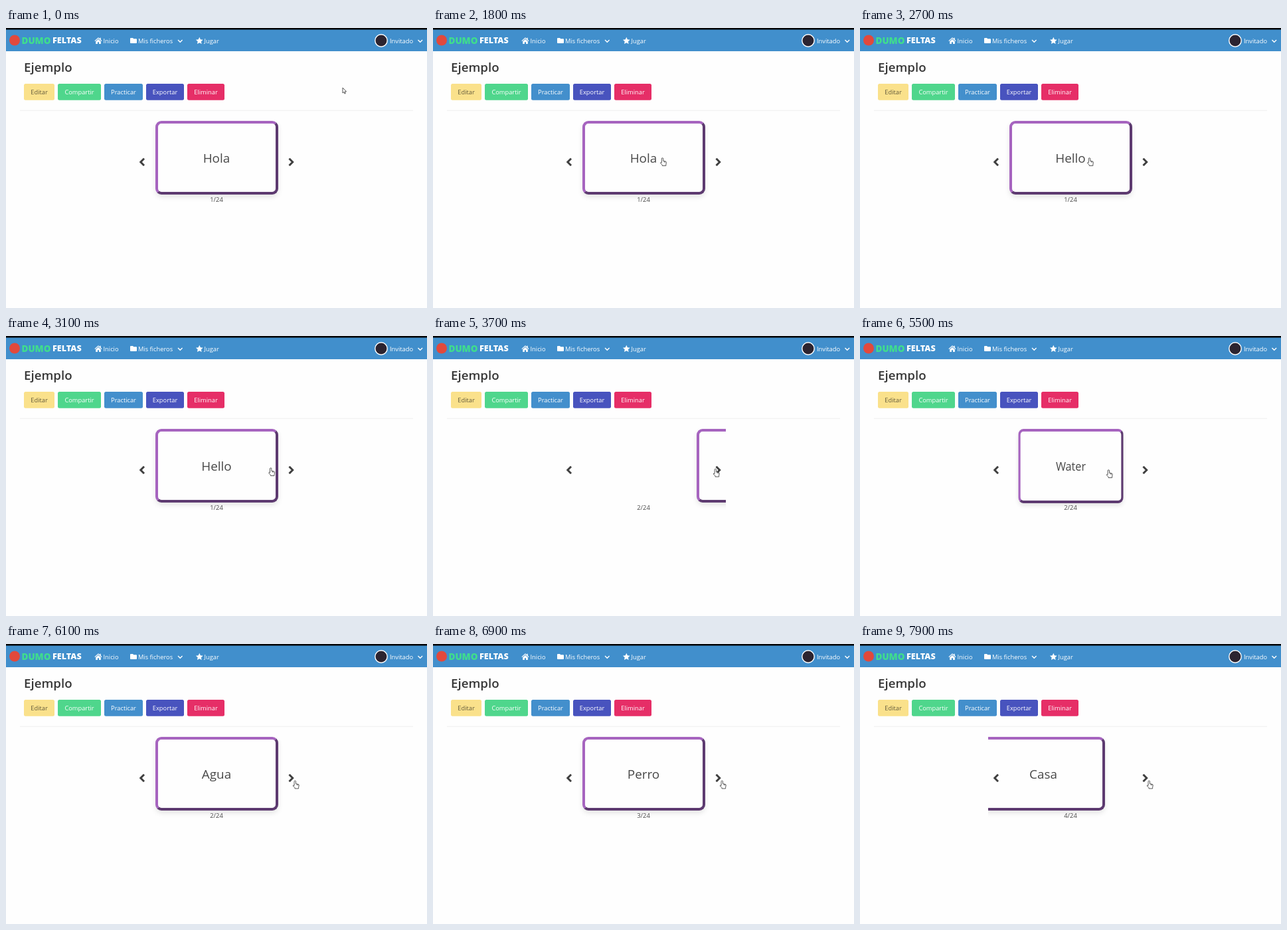
Animation, 634 px wide and 422 px high, one loop 8000 ms. Source, as an HTML page:

```html
<!DOCTYPE html>
<html lang="es">
<head>
<meta charset="utf-8">
<title>Ejemplo</title>
<style>
  html, body { margin: 0; width: 100%; height: 100%; overflow: hidden; background: #fefefe; }
  body { position: relative; font-family: "Open Sans", "Noto Sans", sans-serif; }
  svg { position: absolute; left: 0; top: 0; }
  text { font-size: 9.3px; fill: #fff; }
  .logo { font-weight: 800; }
  .mid { text-anchor: middle; }
  #slider { position: absolute; left: 193px; top: 130px; width: 247.5px; height: 145px; overflow: hidden; }
  #card {
    position: absolute; left: 31.5px; top: 9.5px; width: 185px; height: 111.5px;
    box-sizing: border-box; border: 4px solid; border-radius: 9px;
    border-color: #a664bf #5d3a70 #5d3a70 #a664bf; background: #fefefe;
    box-shadow: 0 4px 8px -1px rgba(10, 10, 10, .12);
    font-size: 18.9px; line-height: 104px; text-align: center; color: #484848;
  }
</style>
</head>
<body>
<svg width="634" height="422" viewBox="0 0 634 422">
  <rect width="634" height="35" fill="#418fcc"/>
  <rect width="634" height="2.5" fill="#050505"/>
  <circle cx="13" cy="18.5" r="8" fill="#e2493c"/>
  <text class="logo" x="23.5" y="23.5" style="font-size:13.5px;fill:#3fdd8d">DUMO</text>
  <text class="logo" x="70" y="23.2" style="font-size:12.6px">FELTAS</text>

  <g fill="#fff">
    <path d="M133.4 19.2 139 14.2l2.2 2V14.8h1.5v2.7l1.9 1.7-.8.9-4.8-4.3-4.8 4.3ZM135.2 20.2l3.8-3.4 3.8 3.4V24h-2.7v-2.8h-2.2V24h-2.7Z"/>
    <path d="M187 16q0-1 1-1h3l1.3 1.3h3.7q1 0 1 1V22q0 1-1 1h-8q-1 0-1-1Z"/>
    <path id="star"/>
    <text x="146.5" y="23">Inicio</text>
    <text x="199" y="23">Mis ficheros</text>
    <text x="298.5" y="23">Jugar</text>
    <text x="578" y="23">Invitado</text>
  </g>
  <path d="m259 18 3.3 3.3 3.3-3.3M620.5 18l3.3 3.3 3.3-3.3" fill="none" stroke="#fff" stroke-width="1.4"/>
  <circle cx="565" cy="19" r="9.2" fill="#2c2430" stroke="#fff" stroke-width="1.4"/>

  <text x="27" y="66.3" style="font-size:18.7px;font-weight:600;fill:#363636">Ejemplo</text>
  <g id="buttons"></g>
  <path d="M21 124.3H613" stroke="#efefef"/>
</svg>

<div id="slider"><div id="card"></div></div>

<svg width="634" height="422" viewBox="0 0 634 422">
  <path d="m208 196.8-5.2 5.2 5.2 5.2M426.5 196.8l5.2 5.2-5.2 5.2" fill="none" stroke="#404040" stroke-width="3"/>
  <text id="counter" class="mid" x="317" y="262" style="font-size:9.4px;fill:#4a4a4a"></text>
  <g id="cursor" fill="#fff" stroke="#444" stroke-width=".9" stroke-linejoin="round">
    <path id="arrow" d="M0 0V8L1.8 6.4 3 9.1 4.3 8.5 3.1 5.9H5.6Z"/>
    <path id="hand" d="M-1.2 7V1Q-1.2-.2 0-.2T1.2 1V4.3L4.8 5.1Q6 5.4 5.9 6.6L5.3 10V11.6H-.3V10.3L-3 7.6Q-3.1 5.9-1.2 7ZM2.7 5V6.5M4.2 5.3V6.7"/>
  </g>
</svg>

<script>
const LOOP = 8000, STEP = 100;
const $ = id => document.getElementById(id);

const buttons = [
  ["Editar", 27, 73, "#fae18b", "#625a3c"],
  ["Compartir", 78, 143, "#4fd68c", "#fff"],
  ["Practicar", 148, 206, "#438fcc", "#fff"],
  ["Exportar", 211, 268, "#4853be", "#fff"],
  ["Eliminar", 273, 329, "#e62e67", "#fff"]
];
$("buttons").innerHTML = buttons.map(([label, x1, x2, fill, ink]) =>
  `<rect x="${x1}" y="84" width="${x2 - x1}" height="24.7" rx="2.5" fill="${fill}"/>
   <text class="mid" x="${(x1 + x2) / 2}" y="100.2" style="fill:${ink}">${label}</text>`).join("");

const starPoints = Array.from({ length: 10 }, (_, i) => {
  const r = i % 2 ? 2.7 : 5.7, a = i * Math.PI / 5;
  return `${291.3 + r * Math.sin(a)} ${19.5 - r * Math.cos(a)}`;
});
$("star").setAttribute("d", `M${starPoints.join("L")}Z`);

// [time, word, card number]
const faces = [
  [0, "Hola", 1], [2000, "Hello", 1], [3700, "Agua", 2], [4800, "Water", 2],
  [5600, "Agua", 2], [6500, "Perro", 3], [7300, "Casa", 4]
];
const flipStarts = [1900, 4700, 5500];
const flipAngles = [31, 95.6, 139, 162, 174, 180];
const slideStarts = [3500, 6300, 7100, 7900];
const slideOffsets = [-41, -170, 172, 42, 0];

// [time, x, y] of the pointer tip
const pointerPath = [
  [0, 507, 90], [100, 506, 91], [500, 460, 122], [900, 428, 198], [1000, 428, 198],
  [1800, 345.5, 196], [2700, 345.5, 196], [3300, 425.3, 200.5], [4300, 425.3, 200.5],
  [4500, 374.3, 202], [5800, 374.3, 202], [6100, 435.3, 206.3], [LOOP, 435.3, 206.3]
];

function stepValue(starts, values, t, rest) {
  const start = starts.find(s => t >= s && t < s + values.length * STEP);
  return start === undefined ? rest : values[(t - start) / STEP];
}

function pointerAt(t) {
  const i = pointerPath.findIndex(p => p[0] > t);
  const [t0, x0, y0] = pointerPath[i - 1], [t1, x1, y1] = pointerPath[i];
  const k = (t - t0) / (t1 - t0);
  return [x0 + (x1 - x0) * k, y0 + (y1 - y0) * k];
}

const inside = (x, y, l, t, r, b) => x >= l && x <= r && y >= t && y <= b;

function draw(t) {
  const [, word, number] = faces.filter(f => f[0] <= t).pop();
  const angle = stepValue(flipStarts, flipAngles, t, 0);
  const offset = stepValue(slideStarts, slideOffsets, t, 0);
  $("card").textContent = word;
  $("card").style.transform =
    `translateX(${offset}px) scaleX(${Math.abs(Math.cos(angle * Math.PI / 180))})`;
  $("counter").textContent = `${number}/24`;

  const [x, y] = pointerAt(t);
  const clickable = inside(x, y, 225, 140, 410, 251) || inside(x, y, 420, 190, 440, 214);
  $("cursor").setAttribute("transform", `translate(${x} ${y})`);
  $("hand").style.display = clickable ? "" : "none";
  $("arrow").style.display = clickable ? "none" : "";
}

const begin = performance.now();
function tick() {
  const t = (performance.now() - begin) % LOOP;
  draw(Math.floor(t / STEP) * STEP);
  requestAnimationFrame(tick);
}
tick();
</script>
</body>
</html>
```
